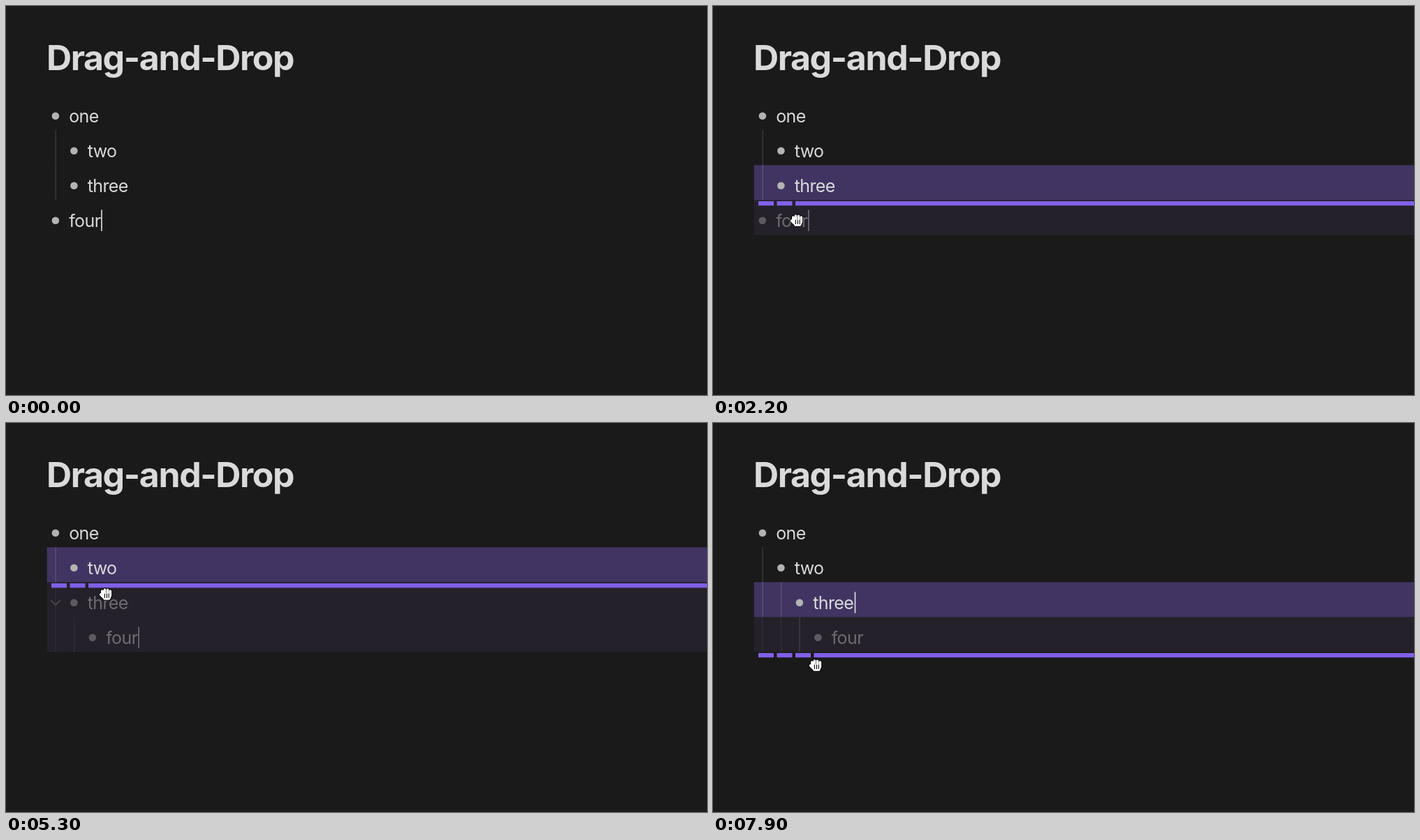
Write an HTML page that moves like this. It is 1004 by 558 pixels and loops after 8000 ms.

```html
<!DOCTYPE html>
<html lang="en">
<head>
<meta charset="utf-8">
<title>Drag-and-Drop</title>
<style>
  html, body { margin: 0; width: 100%; height: 100%; overflow: hidden; background: #1a1a1a; }
  svg { display: block; width: 1004px; height: 558px; }
  text {
    fill: #dadada;
    font: 400 25px Inter, "Liberation Sans", sans-serif;
    font-optical-sizing: none;
    letter-spacing: -0.6px;
  }
  .title { font-size: 50px; font-weight: 700; letter-spacing: -1.4px; }
  .bullet { fill: #b3b3b3; }
  .guide { fill: #fff; fill-opacity: .12; }
  .guide.active { fill-opacity: .28; }
  .chevron { fill: none; stroke: #7a7a7a; stroke-width: 2; stroke-linecap: round; stroke-linejoin: round; }
  .caret { fill: #e2e2e2; }
  .target { fill: #413462; }
  .moved { fill: #24212b; }
  .bar { fill: #8060e8; }
  .edge, .face { fill: none; stroke-linecap: round; stroke-linejoin: round; }
  .edge { stroke: #000; }
  .face { stroke: #fff; }
</style>
</head>
<body>
<svg viewBox="0 0 1004 558">
  <defs>
    <g id="beam">
      <path id="beam-line" class="face" stroke-width="4.6"
        d="M-5-12.6Q0-12.6 0-8V8Q0 12.6-5 12.6M5-12.6Q0-12.6 0-8M0 8Q0 12.6 5 12.6M-2.4 4H2.4"/>
      <path class="edge" stroke-width="1.7"
        d="M-5-12.6Q0-12.6 0-8V8Q0 12.6-5 12.6M5-12.6Q0-12.6 0-8M0 8Q0 12.6 5 12.6M-2.4 4H2.4"/>
    </g>
    <path id="open-line" d="M-9 1.5L-4 6M-6.5-6.5L-3.5 2M-1.6-9.5L-.8 1M3.4-8.8L2.6 1M8.2-4.8L6 4M-4 4L-1.5 9H4.5L6.3 3L0 1Z"/>
    <path id="fist-line" d="M-7.5 1L-4 4.5M-5.2-4V2M-1.6-6V1M2.5-5.6V1M6.4-4V3M-4 3L-2 7H4.5L6.4 2L0 1Z"/>
    <g id="open">
      <use href="#open-line" class="edge" stroke-width="5.8"/>
      <use href="#open-line" class="face" stroke-width="3.7" style="fill:#fff"/>
      <path class="edge" stroke-width="1.1" d="M-1.6 2V7.5M1.4 2V7.5M4.2 2V7.5"/>
    </g>
    <g id="fist">
      <use href="#fist-line" class="edge" stroke-width="5.6"/>
      <use href="#fist-line" class="face" stroke-width="3.6" style="fill:#fff"/>
      <path class="edge" stroke-width="1.1" d="M-1.6 0V5.5M1.4 0V5.5M4.2 0V5.5"/>
    </g>
  </defs>
  <text class="title" x="58" y="91.7">Drag-and-Drop</text>
  <g id="scene"></g>
</svg>
<script>
const LOOP = 8000, STEP = 100;
const TOP = 128, ROW = 50, INDENT = 26.5;
const WORDS = ["one", "two", "three", "four"];

// Nesting level of each row from the given time on
const layouts = [
  [0, [0, 1, 1, 0]],
  [2900, [0, 1, 1, 2]],
  [5400, [0, 1, 2, 3]]
];

// from, to, first dragged row, highlighted row, bar y, bar level
const drags = [
  [2000, 2200, 3, -1, 330, 0],
  [2200, 2900, 3, 2, 280, 2],
  [4700, 5400, 2, 1, 230, 2],
  [7400, 8000, 3, 2, 330, 3]
];

// from, to, row, x
const carets = [
  [0, 100, 3, 136.2], [600, 1100, 3, 136.2], [1600, 2900, 3, 136.2],
  [2900, 3400, 3, 189.3], [3900, 4400, 3, 189.3], [4900, 5400, 3, 189.3],
  [5400, 5900, 2, 202.7], [6400, 6900, 2, 202.7], [7400, 8000, 2, 202.7]
];

// Hover arrows beside "three": from, to, x
const chevrons = [[3900, 5400, 71], [6200, 6500, 97.3]];

// Pointer path: time, x, y
const path = [
  [300, 168, 535], [1000, 84.5, 326], [1100, 79, 319], [1300, 73, 316],
  [1900, 73, 316], [2200, 120, 307], [2800, 164, 284], [3600, 164, 284],
  [4400, 97, 257], [4600, 97, 257], [5300, 143, 245], [5400, 150, 172],
  [5700, 150, 172], [5900, 132, 243], [6100, 132, 243], [6600, 146, 328],
  [7000, 154, 307], [7300, 154, 307], [7900, 147, 347]
];
const shapes = [
  [300, "beam"], [1100, "open"], [2000, "fist"], [2900, "beam"], [4200, "open"],
  [4700, "fist"], [5400, "beam"], [6800, "open"], [7400, "fist"]
];

const scene = document.getElementById("scene");
const during = (list, t) => list.find(s => t >= s[0] && t < s[1]);
const latest = (list, t) => list.filter(s => t >= s[0]).pop();
const rect = (cls, x, y, w, h) =>
  `<rect class="${cls}" x="${x}" y="${y}" width="${w}" height="${h}"/>`;

function row(i, t, level, dim) {
  const y = TOP + i * ROW, x = level * INDENT;
  let out = "";
  for (let k = 0; k < level; k++) {
    const active = t >= 5400 && k === 2 ? " active" : "";
    out += rect("guide" + active, 70.3 + k * INDENT, y + .3, 1.6, ROW);
  }
  out += `<circle class="bullet" cx="${70.9 + x}" cy="${y + 29.8}" r="5.3"/>`;
  out += `<text x="${90.2 + x}" y="${y + 39.1}">${WORDS[i]}</text>`;
  const arrow = during(chevrons, t);
  if (i === 2 && arrow)
    out += `<path class="chevron" d="M${arrow[2] - 6} ${y + 27}l6 6 6-6"/>`;
  const caret = during(carets, t);
  if (caret && caret[2] === i) out += rect("caret", caret[3], y + 14.4, 1.6, 30.4);
  return `<g opacity="${dim ? .4 : 1}">${out}</g>`;
}

function bar(y, level) {
  let out = "";
  for (let k = 0; k <= level; k++) {
    const x = 65 + k * INDENT;
    out += rect("bar", x, y, k < level ? 22 : 1004 - x, 6.3);
  }
  return out;
}

function pointer(t) {
  if (t < path[0][0]) return "";
  const n = path.findIndex(p => p[0] >= t);
  const b = path[n], a = path[Math.max(0, n - 1)];
  const u = b === a ? 0 : (t - a[0]) / (b[0] - a[0]);
  const e = u * u * (3 - 2 * u);
  const x = a[1] + (b[1] - a[1]) * e, y = a[2] + (b[2] - a[2]) * e;
  return `<use href="#${latest(shapes, t)[1]}" transform="translate(${x} ${y})"/>`;
}

function render(t) {
  const levels = latest(layouts, t)[1];
  const drag = during(drags, t);
  const first = drag ? drag[2] : WORDS.length;
  let out = "";
  if (drag) {
    out += rect("moved", 58.7, TOP + first * ROW, 946, (4 - first) * ROW + .6);
    if (drag[3] >= 0) out += rect("target", 58.7, TOP + drag[3] * ROW + .3, 946, ROW);
  }
  out += levels.map((level, i) => row(i, t, level, i >= first)).join("");
  if (drag) out += bar(drag[4], drag[5]);
  scene.innerHTML = out + pointer(t);
}

const start = performance.now();
let shown = -1;
function tick() {
  const t = Math.floor((performance.now() - start) % LOOP / STEP) * STEP;
  if (t !== shown) render(shown = t);
  requestAnimationFrame(tick);
}
tick();
</script>
</body>
</html>
```
